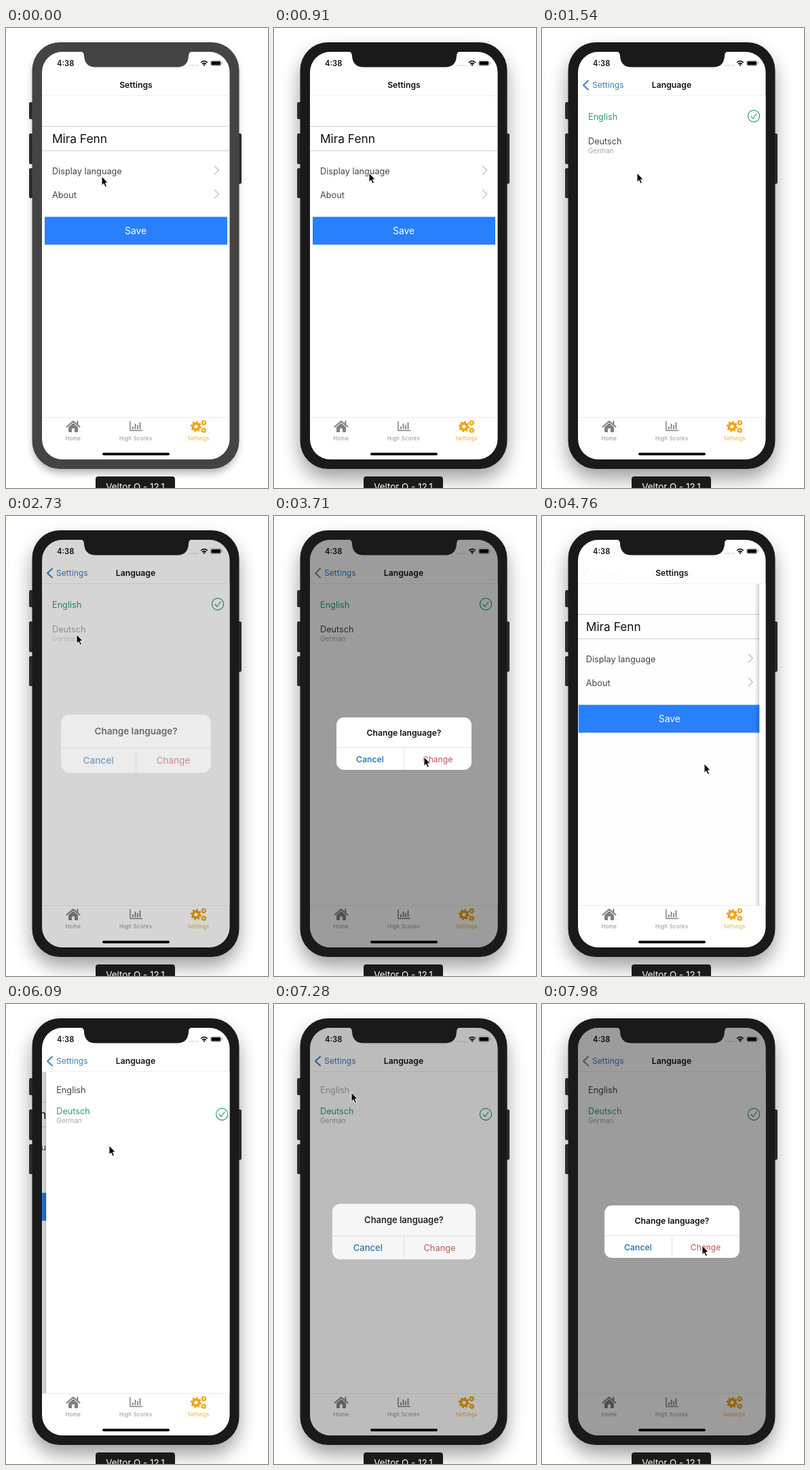
An HTML page for the animation above (8000 ms loop, 386 by 676 pixels).

```html
<!DOCTYPE html>
<html lang="en">
<head>
<meta charset="utf-8">
<title>Language settings</title>
<style>
  html, body { margin: 0; width: 100%; height: 100%; overflow: hidden; background: #fff; }
  svg { display: block; width: 100vw; height: 100vh; }
  text { font: 12.7px Inter, Roboto, sans-serif; fill: #444; }
  .bold { font-weight: 600; font-size: 12.2px; fill: #111; }
  .mid { text-anchor: middle; }
  .tab text { font-size: 7.6px; letter-spacing: .4px; fill: #8c8c8c; text-anchor: middle; }
  .line { fill: none; stroke-linecap: round; stroke-linejoin: round; }
</style>
</head>
<body>
<svg viewBox="0 0 386 676">
  <defs>
    <clipPath id="screenClip"><rect x="53" y="35" width="276.5" height="599" rx="30"/></clipPath>
    <clipPath id="contentClip"><rect x="53" y="100" width="276.5" height="472"/></clipPath>
    <filter id="wide" x="-30%" y="-30%" width="160%" height="160%"><feGaussianBlur stdDeviation="14"/></filter>
    <filter id="tight" x="-30%" y="-30%" width="160%" height="160%"><feGaussianBlur stdDeviation="6"/></filter>
    <linearGradient id="edge"><stop stop-opacity="0"/><stop offset="1" stop-opacity=".18"/></linearGradient>
    <g id="gear" fill="none" stroke="#f0a30a">
      <circle r="4.6" stroke-width="3.6"/>
      <circle r="6.9" stroke-width="2.4" pathLength="16" stroke-dasharray="1 1"/>
    </g>
    <path id="chevron" class="line" d="M0 0l6 6-6 6" stroke="#c4c4c8" stroke-width="1.4"/>
  </defs>

  <rect id="softShadow" x="40" y="28" width="301" height="626" rx="40" filter="url(#tight)" opacity=".3"/>
  <rect id="deepShadow" x="38" y="36" width="305" height="626" rx="42" filter="url(#wide)" opacity=".38"/>
  <path fill="#2b2b2b" d="M36 109h5v25h-5q-2 0-2-2v-21q0-2 2-2zM36 155h5v45h-5q-2 0-2-2v-41q0-2 2-2zM36 206h5v44h-5q-2 0-2-2v-40q0-2 2-2zM341 155h4q2 0 2 2v70q0 2-2 2h-4z"/>
  <rect id="body" x="38.5" y="21" width="305" height="627" rx="41"/>

  <g clip-path="url(#screenClip)">
    <rect x="53" y="35" width="277" height="599" fill="#fff"/>

    <g clip-path="url(#contentClip)">
      <g id="settingsPage">
        <path d="M53 144.5h277M53 180.5h277" stroke="#cfcfcf"/>
        <text x="68" y="169" style="font-size:17.3px;fill:#111">Mira Fenn</text>
        <text x="68" y="214.5">Display language</text>
        <text x="68" y="249.5">About</text>
        <use href="#chevron" x="307.5" y="203"/>
        <use href="#chevron" x="307.5" y="238"/>
        <rect x="57" y="277.5" width="269" height="41" fill="#2880fd"/>
        <text class="mid" x="191" y="303" style="font-size:13.8px;fill:#fff">Save</text>
        <rect id="pageDim" x="53" y="100" width="277" height="472"/>
      </g>
      <g id="languagePage">
        <rect x="46" y="100" width="7" height="472" fill="url(#edge)"/>
        <rect x="53" y="100" width="277" height="472" fill="#fff"/>
        <text id="english" x="68">English</text>
        <g id="german">
          <text id="deutsch" x="68">Deutsch</text>
          <text x="68" y="13.3" style="font-size:10px;fill:#a8a8a8">German</text>
        </g>
        <g id="check" class="line" stroke="#2d9a7c" stroke-width="1.2">
          <circle r="8.6"/><path d="M-4 .5l3 3 5-7"/>
        </g>
      </g>
    </g>

    <text class="bold mid" id="settingsTitle" x="191.5" y="88">Settings</text>
    <g id="languageHeader">
      <text class="bold mid" x="191" y="88">Language</text>
      <path id="backArrow" class="line" d="M68 77.5l-7 6.5 7 6.5" stroke-width="2"/>
      <text x="74" y="88" style="font-size:12.1px;fill:#3d7ebf">Settings</text>
    </g>
    <path d="M53 99.5h277M53 572.5h277" stroke="#ececec"/>

    <text class="bold" x="75" y="56" style="font-size:11.2px">4:38</text>
    <path d="M270 55h13" stroke="#bbb" stroke-width="1.6" stroke-dasharray="1.6 2"/>
    <path class="line" d="M287.5 50.5q4.5-4 9 0M289.6 52.6q2.4-2 4.8 0" stroke="#000" stroke-width="1.6"/>
    <circle cx="292" cy="54.4" r="1.2"/>
    <rect x="301.5" y="48" width="15.5" height="7.5" rx="2.2" fill="none" stroke="#999" stroke-width=".8"/>
    <rect x="302.5" y="49" width="13.5" height="5.5" rx="1.3"/>
    <path d="M318.3 50.2v3" stroke="#999"/>

    <g class="tab">
      <path fill="#808080" d="M99 580.5l7 6v6.5q0 1-1 1h-4v-5.5h-4v5.5h-4q-1 0-1-1v-6.5z"/>
      <path class="line" d="M89.5 586l9.5-8 9.5 8M105.3 578v4" stroke="#808080" stroke-width="2"/>
      <path d="M183 578v13.5h18" fill="none" stroke="#808080" stroke-width="1.5"/>
      <path d="M187 589.5v-4M190.5 589.5v-8M194 589.5v-6M197.5 589.5v-10" stroke="#808080" stroke-width="1.8"/>
      <use href="#gear" transform="translate(280 585.7)"/>
      <use href="#gear" transform="translate(291.3 580.2) scale(.5)"/>
      <use href="#gear" transform="translate(291.3 591.3) scale(.5)"/>
      <text x="99" y="606">Home</text>
      <text x="191" y="606">High Scores</text>
      <text x="283.5" y="606" style="fill:#f0a92a">Settings</text>
    </g>

    <rect id="backdrop" x="53" y="35" width="277" height="599"/>
    <g id="alert">
      <rect x="92" y="296" width="199" height="77" rx="11" fill="#fff"/>
      <path d="M92 340.5h199M191.5 340.5v32.5" stroke="#e4e4e6"/>
      <text class="bold mid" x="191.5" y="322.5">Change language?</text>
      <text class="mid" x="141.5" y="361.5" style="font-size:12.3px;font-weight:500;fill:#1c6cb0">Cancel</text>
      <text class="mid" x="241" y="361.5" style="font-size:12.1px;fill:#c2504c">Change</text>
    </g>
    <rect x="142" y="624.3" width="99" height="3.6" rx="1.8"/>
  </g>
  <path id="notch" d="M109 34Q115 35 115 41Q116 57.500 132 57.500H252Q268 57.500 269 41Q269 35 275 34Z"/>

  <rect x="132" y="659" width="117" height="30" rx="4" fill="#1b1b1b"/>
  <text class="mid" x="190.5" y="678.5" style="font-size:13.4px;fill:#fff">Veltor Q - 12.1</text>

  <path id="cursor" d="M0 0V13.500L3 10.700L5.200 15.600L7.500 14.600L5.300 9.800H9.300Z" stroke="#fff" stroke-width="1"/>
</svg>

<script>
const LOOP = 8000, STEP = 70, PAGE_WIDTH = 277;
const FOCUS_AT = 770, SELECT_AT = 4340;
const PAGE_MS = 540, ALERT_MS = 200;

const cursorPath = [
  [0, 141, 218], [420, 141, 218], [630, 140, 213], [1960, 140, 213],
  [2450, 104, 174], [2860, 104, 174], [3600, 221, 354], [3710, 221, 354],
  [3950, 239, 364], [4830, 239, 364], [5500, 152, 208], [6200, 152, 208],
  [6800, 114, 130], [7300, 114, 130], [7910, 236, 355], [LOOP, 236, 355],
];

const el = Object.fromEntries([...document.querySelectorAll('svg [id]')].map(node => [node.id, node]));
const set = (node, attrs) => Object.entries(attrs).forEach(([key, value]) => node.setAttribute(key, value));
const ramp = (t, start, duration) => Math.min(1, Math.max(0, (t - start) / duration));
const smooth = p => p * p * (3 - 2 * p);
const between = (t, start, end) => t >= start && t < end;

// cubic-bezier(.32, .72, 0, 1), solved by bisection
function pageEase(x) {
  if (x <= 0 || x >= 1) return x;
  let low = 0, high = 1;
  for (let i = 0; i < 24; i++) {
    const u = (low + high) / 2;
    if (.96 * u * (1 - u) ** 2 + u ** 3 < x) low = u; else high = u;
  }
  const u = low;
  return 2.16 * u * (1 - u) ** 2 + 3 * u * u * (1 - u) + u ** 3;
}

function cursorAt(t) {
  const i = cursorPath.findIndex(([end]) => end > t);
  const [t0, x0, y0] = cursorPath[i - 1], [t1, x1, y1] = cursorPath[i];
  const p = smooth(ramp(t, t0, t1 - t0));
  return [x0 + (x1 - x0) * p, y0 + (y1 - y0) * p];
}

function drawPages(t) {
  const slide = start => pageEase(ramp(t, start, PAGE_MS));
  const p = slide(1000) - slide(4467) + slide(5760);
  set(el.settingsPage, { transform: `translate(${-PAGE_WIDTH * .33 * p} 0)` });
  set(el.languagePage, {
    transform: `translate(${PAGE_WIDTH * (1 - p)} 0)`,
    visibility: p > 0 ? 'visible' : 'hidden',
  });
  set(el.pageDim, { opacity: .1 * p });
  set(el.settingsTitle, { opacity: 1 - p });
  set(el.languageHeader, { opacity: p });
}

function drawLanguages(t) {
  const german = t >= SELECT_AT;
  const color = selected => `fill:${selected ? '#2d9a7c' : '#444'}`;
  set(el.english, { y: german ? 131 : 135, style: color(!german), opacity: between(t, 7070, 7400) ? .45 : 1 });
  set(el.german, { transform: `translate(0 ${german ? 162 : 170.5})`, opacity: between(t, 2560, 2880) ? .45 : 1 });
  set(el.deutsch, { style: color(german) });
  set(el.check, { transform: `translate(312 ${german ? 162 : 129.5})` });
}

function drawAlert(t) {
  const fade = start => smooth(ramp(t, start, ALERT_MS));
  const hiding = between(t, 4120, 7000);
  const p = fade(2640) - fade(4120) + fade(7156);
  const scale = hiding ? .9 + .1 * p : 1.19 - .19 * p;
  set(el.backdrop, { opacity: .39 * p });
  set(el.alert, {
    opacity: Math.min(1, 1.3 * p),
    transform: `translate(191.5 334.5) scale(${scale}) translate(-191.5 -334.5)`,
  });
  set(el.backArrow, { stroke: p === 1 ? '#8a8a8a' : '#3d7ebf' });
}

function drawDevice(t) {
  const focused = t >= FOCUS_AT;
  const shell = focused ? '#1a1a1a' : '#444';
  set(el.body, { fill: shell });
  set(el.notch, { fill: shell });
  set(el.softShadow, { visibility: focused ? 'hidden' : 'visible' });
  set(el.deepShadow, { visibility: focused ? 'visible' : 'hidden' });
}

const begin = performance.now();
function render(now) {
  const elapsed = Math.max(0, now - begin) % LOOP;
  const t = Math.floor(elapsed / STEP) * STEP;
  drawDevice(t);
  drawPages(t);
  drawLanguages(t);
  drawAlert(t);
  set(el.cursor, { transform: `translate(${cursorAt(t)})` });
  requestAnimationFrame(render);
}
render(begin);
</script>
</body>
</html>
```
